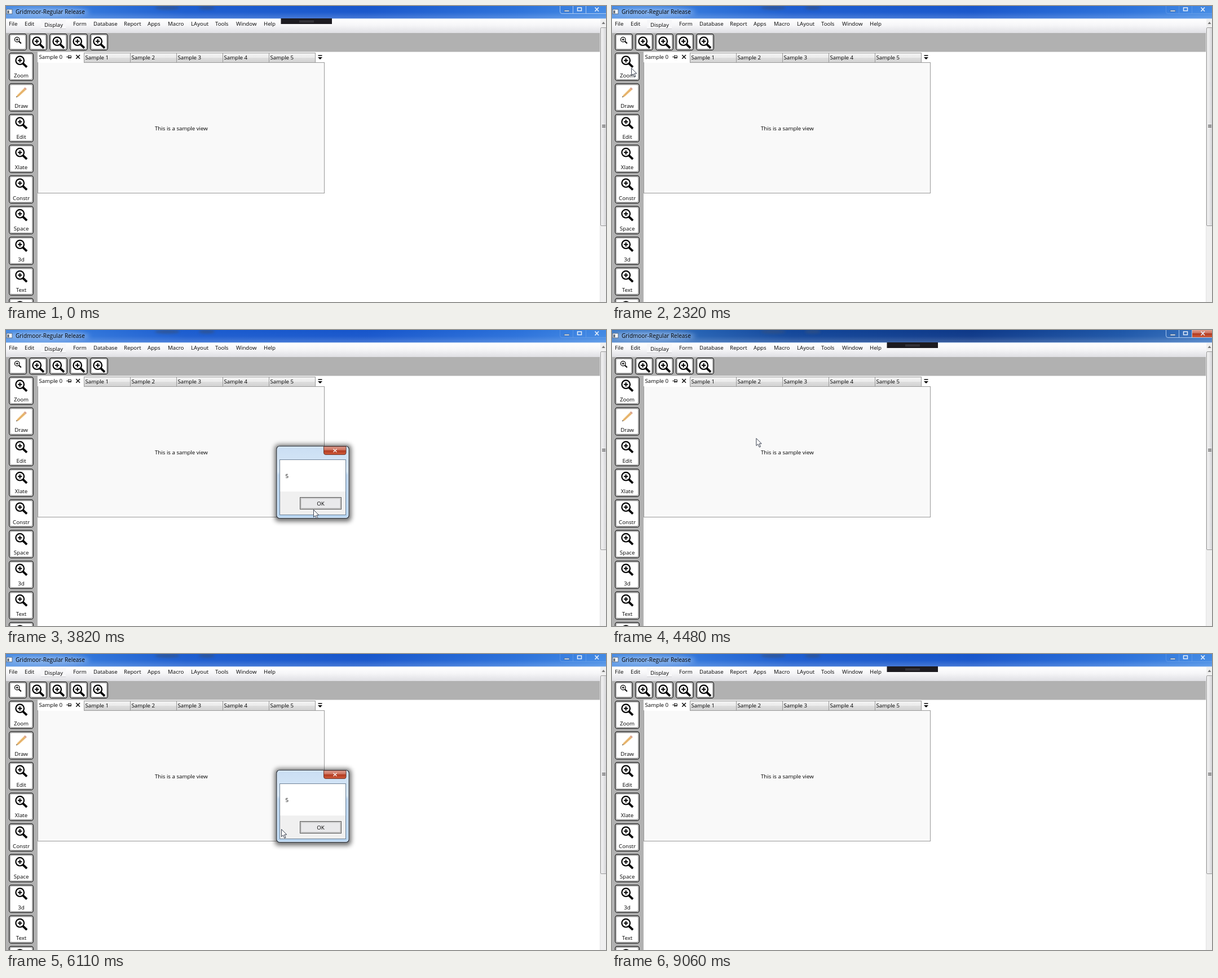
Animation, 1064 px wide and 526 px high, one loop 9.14 s. Source, as an HTML page:

```html
<!DOCTYPE html>
<html lang="en">
<head>
<meta charset="utf-8">
<title>Sample window</title>
<style>
  html, body { margin: 0; width: 100%; height: 100%; overflow: hidden; background: #fff; }
  svg { display: block; }
  text { font: 9.7px "Open Sans", "Noto Sans", sans-serif; fill: #000; }
</style>
</head>
<body>
<svg id="stage" width="1064" height="526" viewBox="0 0 1064 526">
  <defs>
    <linearGradient id="bright">
      <stop offset="0" stop-color="#4288e2"/><stop offset=".14" stop-color="#2f74da"/>
      <stop offset=".3" stop-color="#1b5ccf"/><stop offset=".6" stop-color="#1655cb"/>
      <stop offset=".85" stop-color="#2a70da"/><stop offset="1" stop-color="#4189e4"/>
    </linearGradient>
    <linearGradient id="dark">
      <stop offset="0" stop-color="#3b78c4"/><stop offset=".14" stop-color="#2562b4"/>
      <stop offset=".3" stop-color="#12469a"/><stop offset=".6" stop-color="#0d3888"/>
      <stop offset=".85" stop-color="#1d56a8"/><stop offset="1" stop-color="#3a74c0"/>
    </linearGradient>
    <linearGradient id="sheen" x2="0" y2="1">
      <stop offset="0" stop-color="#fff" stop-opacity="0"/>
      <stop offset=".5" stop-color="#fff" stop-opacity=".03"/>
      <stop offset="1" stop-color="#fff" stop-opacity=".2"/>
    </linearGradient>
    <linearGradient id="menu" x2="0" y2="1">
      <stop offset="0" stop-color="#fff"/><stop offset=".45" stop-color="#f6f6f8"/><stop offset="1" stop-color="#dfdfe3"/>
    </linearGradient>
    <linearGradient id="tab" x2="0" y2="1">
      <stop offset="0" stop-color="#f3f3f3"/><stop offset=".5" stop-color="#ebebeb"/>
      <stop offset=".5" stop-color="#dedede"/><stop offset="1" stop-color="#d2d2d2"/>
    </linearGradient>
    <linearGradient id="thumb">
      <stop offset="0" stop-color="#f5f5f5"/><stop offset=".5" stop-color="#e4e4e6"/><stop offset="1" stop-color="#c9c9cd"/>
    </linearGradient>
    <linearGradient id="glass" x2="0" y2="1">
      <stop offset="0" stop-color="#cadef3"/><stop offset=".35" stop-color="#d8e8f8"/>
      <stop offset=".4" stop-color="#bdd6ef"/><stop offset="1" stop-color="#b8d6f2"/>
    </linearGradient>
    <linearGradient id="red" x2="0" y2="1">
      <stop offset="0" stop-color="#e0a193"/><stop offset=".48" stop-color="#cb6a55"/>
      <stop offset=".5" stop-color="#b23a20"/><stop offset="1" stop-color="#cf5c3c"/>
    </linearGradient>
    <filter id="blur" x="-30%" y="-100%" width="160%" height="300%"><feGaussianBlur stdDeviation="4"/></filter>
    <filter id="soft" x="-30%" y="-100%" width="160%" height="300%"><feGaussianBlur stdDeviation="2"/></filter>
    <g id="lens" fill="none" stroke="#000">
      <circle cx="-2.3" cy="-2.3" r="7.3" stroke-width="2.2"/>
      <path d="M-6-2.3H1.4M-2.3-6V1.4" stroke-width="2"/>
      <path d="M3 3L10 9.6" stroke-width="3.8"/>
    </g>
    <g id="pencil">
      <path d="M-9 9L-7.4 5 4.600-7 8-4-4.500 7.500Z" fill="#ecbd78"/>
      <path d="M-6 6.500L6.500-5.600" stroke="#d29a50" stroke-width=".8"/>
      <path d="M4.600-7L6.700-9 9.800-6 8-4Z" fill="#d9a08a"/>
      <path d="M-9 9L-8.2 6.400-6.400 8.100Z" fill="#555"/>
    </g>
  </defs>
  <rect width="1064" height="526" fill="#fff"/>
  <g id="window"></g>
  <rect id="hover" x=".5" y="81.5" width="55" height="53" fill="none" stroke="#c6c6c6"/>
  <g id="recorder">
    <rect x="487.5" y="22" width="90.5" height="10" fill="#1d1b20"/>
    <path d="M520 26.5h26M520 28.5h26" stroke="#4a484e"/>
  </g>
  <g id="dialog"></g>
  <path id="cursor" d="M.5.5V13.6L3.5 10.8 5.9 16.2 8 15.3 5.7 10H9.8Z" fill="#fff" stroke="#222a3a" stroke-width=".9"/>
</svg>
<script>
const LOOP = 9140;
const $ = id => document.getElementById(id);

const label = (x, y, words, extra = '') => `<text x="${x}" y="${y}" ${extra}>${words}</text>`;
const box = (x, y, w, h, fill, extra = '') =>
  `<rect x="${x}" y="${y}" width="${w}" height="${h}" fill="${fill}" ${extra}/>`;
const line = (d, color = '#000', width = 1) =>
  `<path d="${d}" fill="none" stroke="${color}" stroke-width="${width}"/>`;
const icon = (id, x, y, scale = 1) =>
  `<use href="#${id}" transform="translate(${x} ${y}) scale(${scale})"/>`;
const button = (x, y, w, h) =>
  box(x + .6, y + .6, w - 1.2, h - 1.2, '#dcdcdc', 'rx="4" stroke="#161616" stroke-width="1.2"') +
  box(x + 2.5, y + 2.5, w - 5, h - 5, '#fff', 'rx="2.5" stroke="#8c8c8c" stroke-width=".8"');

function titleBar() {
  return box(0, 0, 1064, 22, 'url(#bright)', 'id="title"') +
    box(0, 0, 1064, 22, 'url(#sheen)') +
    '<ellipse cx="72" cy="11" rx="76" ry="8" fill="#a9c9f2" opacity=".65" filter="url(#blur)"/>' +
    [286, 356].map((x, i) =>
      `<ellipse cx="${x}" cy="3" rx="${22 - 8 * i}" ry="3.5" fill="#35517f" opacity=".65" filter="url(#soft)"/>`).join('') +
    box(0, 22, 1064, 1, '#c3d8f3') +
    box(1, 6, 10, 8, '#f4f6f8', 'stroke="#4a5a70" stroke-width=".8"') +
    box(2.5, 8, 3, 5, '#5b6675') +
    label(17, 13.5, 'Gridmoor-Regular Release', 'style="font-size:10px"') +
    `<g id="frame">${line('M982.5 0V10Q982.5 13.5 986 13.5H1064M1005.5 0V13M1028.5 0V13', '#b9d2f2', .9)}</g>` +
    box(1029, 0, 35, 13, 'url(#red)', 'id="closeRed"') +
    box(990, 7.5, 9, 2.4, '#e6effb', 'stroke="#39506f" stroke-width=".6"') +
    box(1013.5, 3, 7, 5.5, 'none', 'stroke="#e6effb" stroke-width="1.5"') +
    line('M1044.500 2.500L1051 9.500M1051 2.500L1044.500 9.500', '#e6effb', 1.7);
}

function menuBar() {
  const items = { File: 5, Edit: 33, Form: 119, Database: 155, Report: 209, Apps: 251,
    Macro: 287, LAyout: 328, Tools: 371, Window: 408, Help: 457 };
  return box(0, 23, 1054, 25, 'url(#menu)') +
    box(62, 25, 44, 15, '#f7f7f9') + line('M62 40.5H106', '#d0d0d4') +
    label(68, 37, 'Display') +
    Object.entries(items).map(([name, x]) => label(x, 35, name)).join('');
}

function toolbars() {
  const names = ['Zoom', 'Draw', 'Edit', 'Xlate', 'Constr', 'Space', '3d', 'Text', ''];
  let out = box(0, 48, 1054, 33.5, '#b1b1b1') + box(0, 81, 56, 445, '#b1b1b1');
  for (let i = 0; i < 5; i++) {
    const x = 5 + 36 * i;
    out += button(x, 49, 32, 30) + (i ? icon('lens', x + 16, 65) : icon('lens', 21, 61, .58));
  }
  names.forEach((name, i) => {
    const y = 83 + 54.5 * i;
    out += button(5, y, 44, 50) +
      (i === 1 ? icon('pencil', 27, y + 16) : icon('lens', 27, y + 16)) +
      label(27, y + 43.8, name, 'text-anchor="middle"');
  });
  return out;
}

function documentArea() {
  let out = box(56.5, 100.5, 508, 232, '#f9f9f9', 'stroke="#999"');
  for (let i = 1; i < 6; i++) {
    const x = 56.5 + 82 * i;
    out += box(x, 83.5, 82, 17, 'url(#tab)', 'stroke="#999"') + label(x + 2, 95, 'Sample ' + i);
  }
  return out + box(57, 82, 81, 19, '#fff') + label(58.5, 93.5, 'Sample 0') +
    line('M107 90.5H110M110.5 87.5V93.5M110.5 88.5H115.5V92.5H110.5M110.5 91.5H115.5', '#222') +
    line('M124.3 87L131 93.7M131 87L124.3 93.7', '#111', 1.6) +
    line('M553.5 88H560.5', '#000', 1.5) + '<path d="M553 91H561L557 95Z"/>' +
    label(264, 220.5, 'This is a sample view');
}

function scrollBar() {
  return box(1054, 23, 10, 503, '#f0f0f0') + line('M1053.5 48V526', '#e3e3e3') +
    '<path d="M1056.5 32L1059.5 28 1062.5 32Z" fill="#777"/>' +
    box(1054.5, 38.5, 12, 352, 'url(#thumb)', 'rx="1.5" stroke="#999"') +
    line('M1057 211.5H1063M1057 213.5H1063M1057 215.5H1063', '#555');
}

function messageBox() {
  return box(477, 204, 135, 136, '#000', 'rx="6" opacity=".6" filter="url(#blur)"') +
    box(480, 206.5, 128, 128, 'url(#glass)', 'rx="5" stroke="#2b3440" stroke-width="1.2"') +
    box(481.2, 207.7, 125.6, 125.6, 'none', 'rx="4" stroke="#eef6ff" stroke-width=".8"') +
    box(485.5, 230.5, 117, 98, '#fff', 'stroke="#6f8296"') +
    box(486, 287, 116, 41, '#f0f0f0') +
    '<path d="M563.5 207V218Q563.5 221.5 567 221.5H600Q603 221.5 603 218V207Z" fill="url(#red)" stroke="#6b3930"/>' +
    line('M580.5 211.5L586.5 217M586.5 211.5L580.5 217', '#f6e8e5', 1.6) +
    label(495.5, 262.5, '5') +
    box(521.5, 297.5, 73, 21, '#ececec', 'stroke="#555"') +
    box(523, 299, 70, 18, '#e9e9eb', 'stroke="#9a9a9a" stroke-width=".8"') +
    label(558, 311.5, 'OK', 'text-anchor="middle"');
}

$('window').innerHTML = titleBar() + menuBar() + toolbars() + documentArea() + scrollBar();
$('dialog').innerHTML = messageBox();

// Each move: first step time, last step time, step count, final x, final y.
const ENTRY = [1039, 563];
const moves = [
  [220, 370, 3, 670, 411], [680, 750, 2, 371, 257], [980, 1130, 3, 121, 141],
  [1370, 1450, 2, 64, 133], [1700, 2090, 6, 34, 110], [2780, 3000, 4, 426, 436],
  [3150, 3320, 3, 509, 368], [3470, 3820, 5, 545, 319], [3900, 4020, 3, 553, 304],
  [4240, 4530, 5, 181, 164], [4780, 4950, 3, 63, 150], [5090, 5250, 3, 35, 113],
  [5720, 5880, 3, 372, 343], [6110, 6110, 1, 488, 311], [6210, 6210, 1, 545, 311],
  [6470, 6660, 4, 550, 306], [7150, 7520, 5, 774, 446], [7750, 7900, 3, 935, 475],
  [8080, 8130, 2, 985, 497], [8360, 8760, 6, 1010, 528]
];

function cursorAt(t) {
  let [x, y] = ENTRY;
  for (const [start, end, steps, toX, toY] of moves) {
    if (t < start) break;
    const gap = (end - start) / (steps - 1) || 1;
    const part = Math.min(steps, Math.floor((t - start) / gap + 1e-6) + 1) / steps;
    x += (toX - x) * part;
    y += (toY - y) * part;
  }
  return [x, y];
}

const within = (t, ...spans) => spans.some(([a, b]) => t >= a && t < b);
const show = (id, on) => $(id).setAttribute('opacity', +on);

function draw(t) {
  const active = within(t, [4240, 5400], [7150, 9060]);
  const fading = within(t, [2400, 2470], [4160, 4240], [5580, 5650], [7070, 7150]);
  $('title').setAttribute('fill', active ? 'url(#dark)' : 'url(#bright)');
  show('closeRed', active);
  $('frame').setAttribute('opacity', active || t < 2240 ? 1 : .25);
  show('recorder', !within(t, [2240, 4240], [5400, 7150]));
  show('hover', within(t, [1860, 2240], [5170, 5580]));
  $('dialog').setAttribute('opacity', fading ? .5 : +within(t, [2470, 4160], [5650, 7070]));
  $('cursor').setAttribute('transform', `translate(${cursorAt(t)})`);
}

const began = performance.now();
function tick() {
  draw((performance.now() - began) % LOOP);
  requestAnimationFrame(tick);
}
tick();
</script>
</body>
</html>
```
